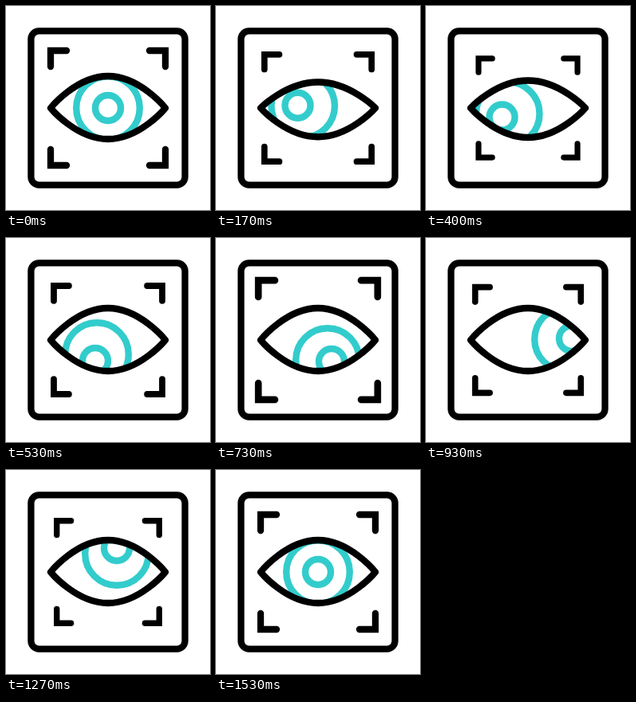
Recreate the animation shown at these times as an HTML page. Size 256 by 256 pixels, loop 1.67 s.

```html
<!DOCTYPE html>
<html lang="en">
<head>
<meta charset="utf-8">
<title>Eye scan</title>
<style>
  html, body { margin: 0; width: 100%; height: 100%; overflow: hidden; background: #fff; }
  svg { display: block; width: 100vw; height: 100vh; }
  .ink { fill: none; stroke: #000; stroke-width: 8.3; stroke-linejoin: round; stroke-linecap: round; }
  .iris { fill: none; stroke: #33cccc; stroke-width: 8.4; }
  #corners { stroke-linejoin: miter; }
</style>
</head>
<body>
<svg viewBox="0 0 256 256">
  <defs>
    <clipPath id="opening"><path class="lid"/></clipPath>
  </defs>
  <rect class="ink" x="31.4" y="31.4" width="193.2" height="193.2" rx="10"/>
  <path class="ink" id="corners" d="M56 76V56H76M180 56H200V76M200 180V200H180M76 200H56V180"/>
  <g clip-path="url(#opening)">
    <circle class="iris" id="ring" cx="128" cy="128" r="39.8"/>
    <circle class="iris" id="pupil" cx="128" cy="128" r="16"/>
  </g>
  <path class="ink lid"/>
</svg>
<script>
  const LOOP = 1670, STEP = 100 / 3;
  const $ = id => document.getElementById(id);
  const lids = document.querySelectorAll('.lid');

  // Keys are [step, value, ...]
  const pupilKeys = [[0, 0, 0], [8, -39, -2], [16, -16, 26], [22, 17, 27], [28, 55, -2], [38, 11, -30], [46, 0, 0]];
  const ringKeys = [[0, 0, 0], [8, -29, -2], [16, -14, 18], [22, 12, 25], [28, 48, -1], [38, 11, -23], [46, 0, 0]];
  const zoomKeys = [[0, 1], [8, .88], [11, .85], [16, .945], [21.5, 1.042], [28, .921], [33, .84], [38, .893], [46, 1]];
  const squintKeys = [[0, 0], [8, 1], [16, 0]];

  // Smooth curve through the keys, at rest at both ends
  function curve(keys, t, k = 1) {
    const last = keys.length - 1;
    if (t >= keys[last][0]) return keys[last][k];
    let i = 0;
    while (t >= keys[i + 1][0]) i++;
    const slope = n => n <= 0 || n >= last ? 0
      : (keys[n + 1][k] - keys[n - 1][k]) / (keys[n + 1][0] - keys[n - 1][0]);
    const [a, b] = [keys[i], keys[i + 1]];
    const d = b[0] - a[0], u = (t - a[0]) / d, v = 1 - u;
    return v * v * ((1 + 2 * u) * a[k] + u * d * slope(i))
      + u * u * ((3 - 2 * u) * b[k] - v * d * slope(i + 1));
  }

  function place(el, keys, t) {
    el.setAttribute('transform', `translate(${curve(keys, t, 1)} ${curve(keys, t, 2)})`);
  }

  function draw(now) {
    const t = Math.floor((now % LOOP + 3.4) / STEP);
    place($('pupil'), pupilKeys, t);
    place($('ring'), ringKeys, t);

    const zoom = curve(zoomKeys, t);
    $('corners').setAttribute('transform', `translate(128 128) scale(${zoom}) translate(-128 -128)`);

    const squint = curve(squintKeys, t);
    const top = 88 + 11 * squint, low = 167 - 4 * squint;
    const d = `M56 128C56 128 88 ${top} 128 ${top}S200 128 200 128S168 ${low} 128 ${low}S56 128 56 128Z`;
    lids.forEach(lid => lid.setAttribute('d', d));
  }

  const start = performance.now();
  function tick() {
    draw(performance.now() - start);
    requestAnimationFrame(tick);
  }
  tick();
</script>
</body>
</html>
```
